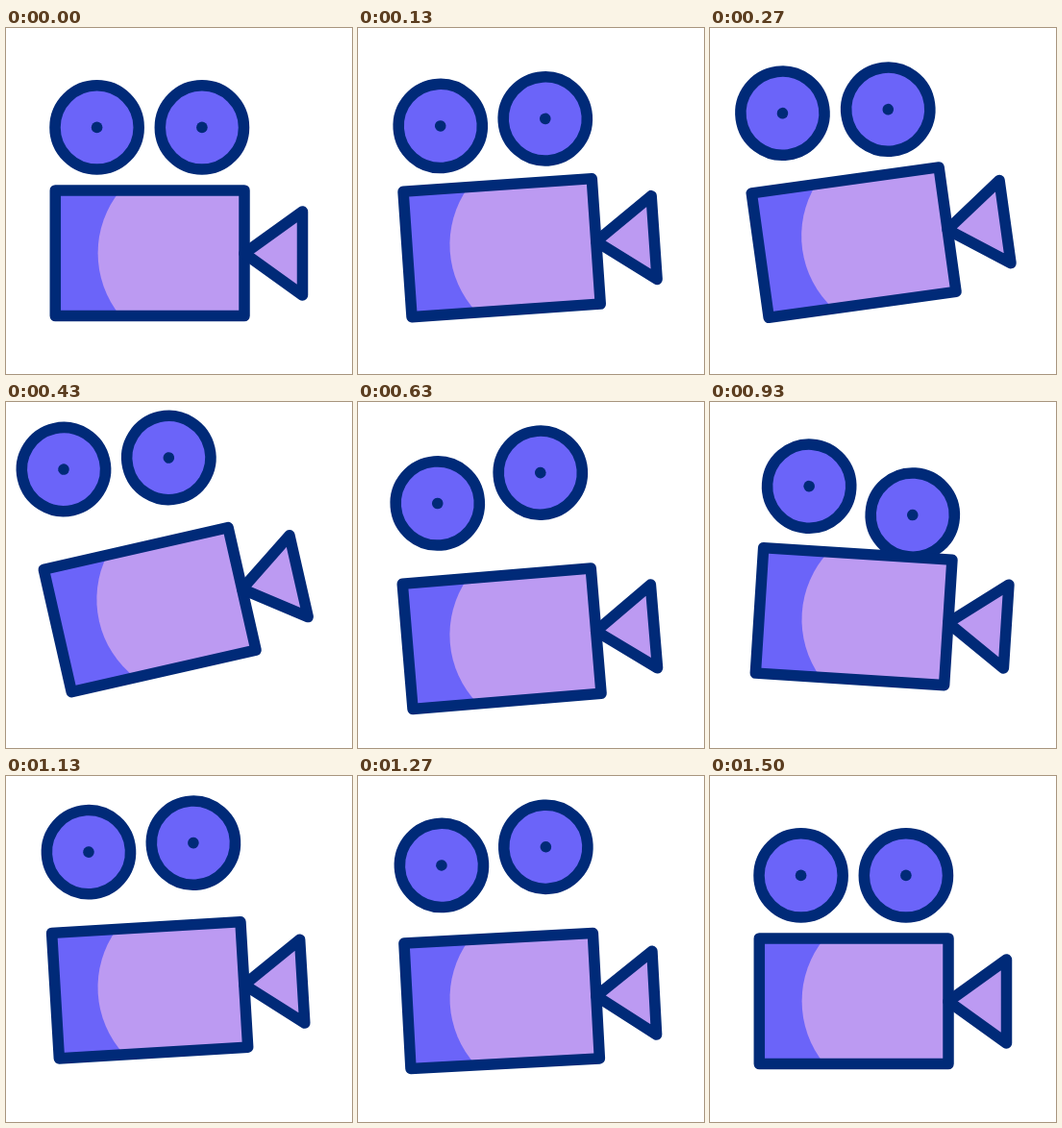
An HTML page for the animation above (2000 ms loop, 360 by 360 pixels).

```html
<!DOCTYPE html>
<html lang="en">
<head>
<meta charset="utf-8">
<title>Film camera</title>
<style>
  html, body { margin: 0; height: 100%; overflow: hidden; background: #fff; }
  svg { display: block; width: 100vw; height: 100vh; }
  .line { stroke: #002a78; stroke-width: 11.5; stroke-linejoin: round; }
  .blue { fill: #6b64f9; }
  .lilac { fill: #bc9af2; }
  .hub { fill: #002a78; }
</style>
</head>
<body>
<svg viewBox="0 0 360 360">
  <defs>
    <g id="reel">
      <circle class="line blue" r="43.6"/>
      <circle class="hub" r="5.8"/>
    </g>
  </defs>
  <g id="camera">
    <g id="left"><use href="#reel"/></g>
    <g id="right"><use href="#reel"/></g>
    <path class="blue" d="M51.3 168.9H248V299.6H51.3Z"/>
    <path class="lilac" d="M248 169H119A102.7 102.7 0 0 0 119 299.5H248Z"/>
    <path class="line" fill="none" d="M51.3 168.9H248V299.6H51.3Z"/>
    <path class="line lilac" d="M248 234.5L308.5 191V278Z"/>
  </g>
</svg>
<script>
const LOOP = 2000, FPS = 30, END = 45;
const CX = 149.7, CY = 234.25, REEL_Y = 103.4;

const smooth = u => u * u * (3 - 2 * u);

// Motion through [step, value] poses: a steady first move, eased swings after it.
const swing = (...poses) => step => {
  const next = poses.findIndex(([at]) => at > step);
  if (next < 1) return 0;
  const [t0, v0] = poses[next - 1], [t1, v1] = poses[next];
  const u = (step - t0) / (t1 - t0);
  return v0 + (v1 - v0) * (next === 1 ? u : smooth(u));
};

const tilt = swing([0, 0], [14, -13.8], [24.6, 6], [35.3, -3.8], [END, 0]);
const lift = swing([0, 0], [14, -19.5], [21.5, 23], [30.5, -19], [38.6, 0]);
const leftHop = swing([4.7, 0], [13, -31.5], [24.6, 0], [26.5, 0], [35, -17], [END, 0]);
const rightHop = swing([7.6, 0], [18.5, -38.4], [27.5, 22], [36.5, -29], [END, 0]);

const move = (id, value) => document.getElementById(id).setAttribute("transform", value);

function draw(time) {
  const step = Math.floor((time % LOOP + 3.4) * FPS / 1000);
  move("camera", `translate(0 ${lift(step)}) rotate(${tilt(step)} ${CX} ${CY})`);
  move("left", `translate(94.6 ${REEL_Y + leftHop(step)})`);
  move("right", `translate(203.9 ${REEL_Y + rightHop(step)})`);
  requestAnimationFrame(() => draw(performance.now() - start));
}

const start = performance.now();
draw(0);
</script>
</body>
</html>
```
